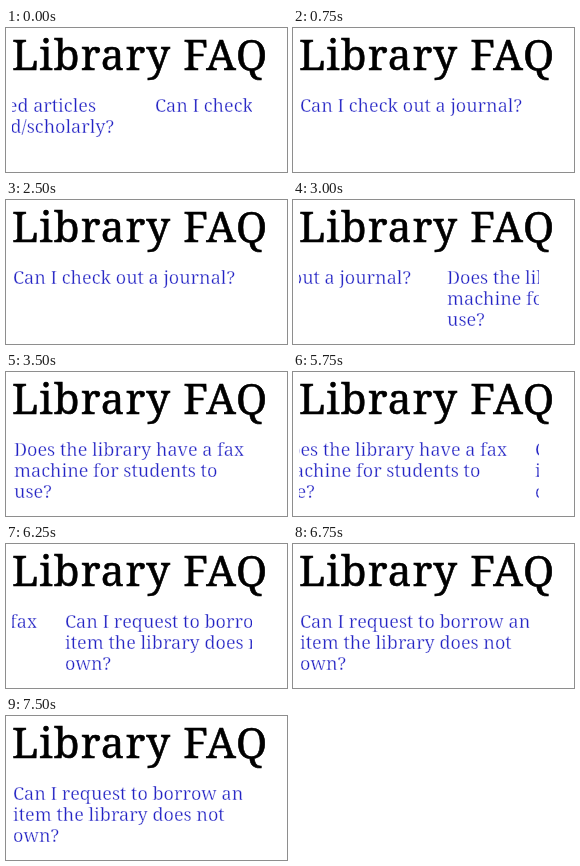
Write an HTML page that moves like this. It is 281 px wide and 144 px high and loops after 8000 ms.

```html
<!DOCTYPE html>
<html lang="en">
<head>
<meta charset="utf-8">
<title>Library FAQ</title>
<style>
html, body { margin: 0; width: 100%; height: 100%; overflow: hidden; background: #fff; }
svg { display: block; font-family: "Noto Serif", serif; }
.title { font-size: 42px; letter-spacing: 1.1px; stroke: #000; stroke-width: .6px; }
/* A thin white outline lightens the strokes of the regular weight. */
.slide { font-size: 18px; font-weight: 300; fill: #2222c4; stroke: #fff; stroke-width: .35px; }
</style>
</head>
<body>
<svg width="281" height="144" viewBox="0 0 281 144">
  <clipPath id="window"><rect x="6" y="60" width="240" height="84"/></clipPath>
  <text class="title" x="6" y="42">Library FAQ</text>
  <g clip-path="url(#window)"><g id="track"></g></g>
</svg>
<script>
const LOOP = 8000, STEP = 250, SLIDE = 980, PITCH = 258;
const LEFT = 7, BASELINE = 84, LEADING = 21;
const starts = [-459, 2554, 5561];
const questions = [
  ["Are the printed articles", "peer-reviewed/scholarly?"],
  ["Can I check out a journal?"],
  ["Does the library have a fax", "machine for students to", "use?"],
  ["Can I request to borrow an", "item the library does not", "own?"]
];
const track = document.getElementById("track");

questions.forEach((lines, i) => lines.forEach((line, row) => {
  const text = document.createElementNS("http://www.w3.org/2000/svg", "text");
  text.setAttribute("class", "slide");
  text.setAttribute("x", LEFT + i * PITCH);
  text.setAttribute("y", BASELINE + row * LEADING);
  text.textContent = line;
  track.append(text);
}));

const swing = p => 0.5 - Math.cos(Math.PI * Math.min(1, Math.max(0, p))) / 2;

function draw(now) {
  // The carousel advances in quarter-second ticks.
  const t = Math.floor((now % LOOP) / STEP) * STEP;
  const shift = starts.reduce((sum, s) => sum + swing((t - s) / SLIDE), 0) * PITCH;
  track.setAttribute("transform", `translate(${-Math.round(shift)} 0)`);
}

const origin = performance.now();
function tick() {
  draw(performance.now() - origin);
  requestAnimationFrame(tick);
}
tick();
</script>
</body>
</html>
```
